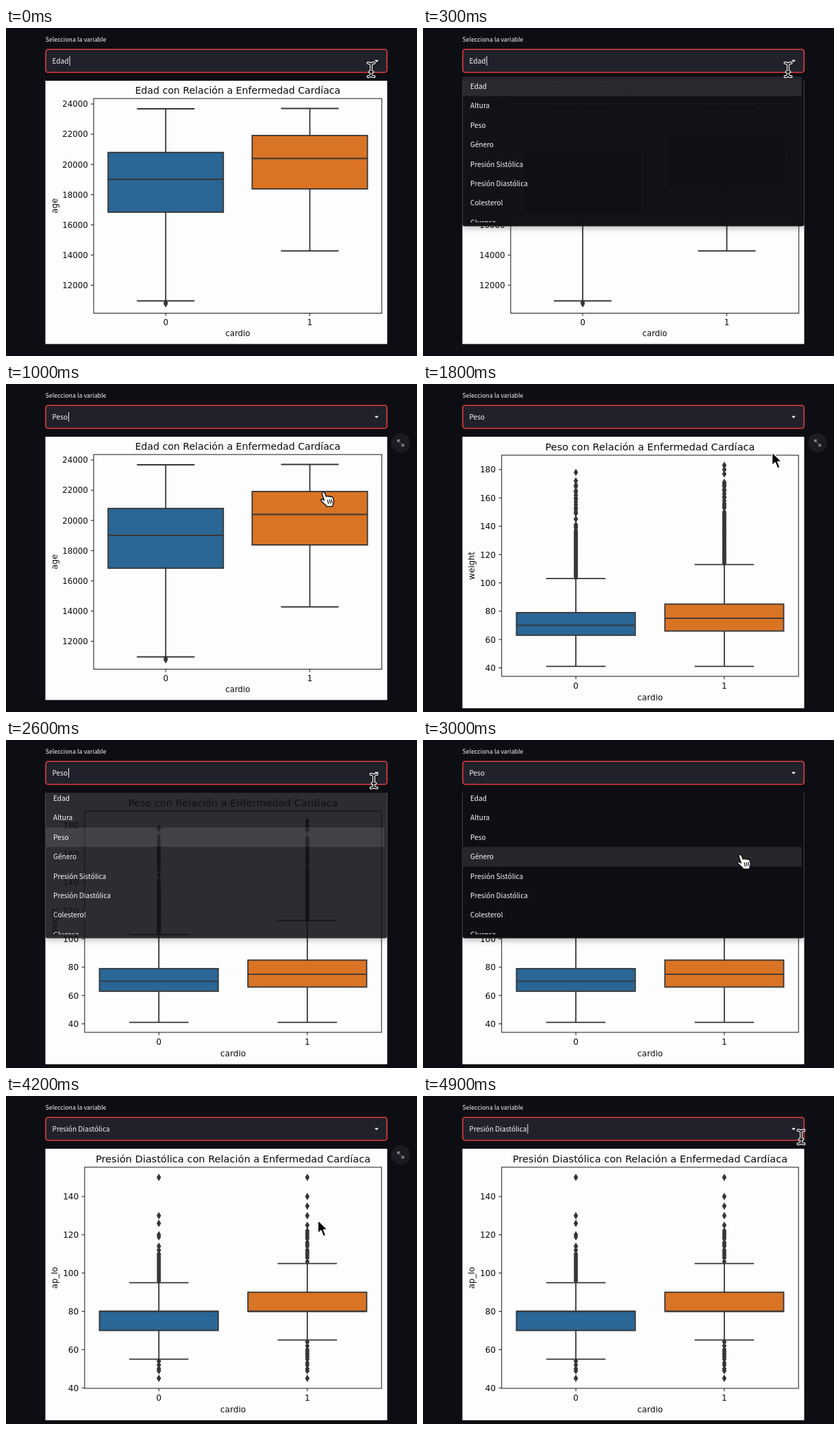
Recreate the animation shown at these times as an HTML page. Size 600 by 479 pixels, loop 5 s.

```html
<!DOCTYPE html>
<html lang="es">
<head>
<meta charset="utf-8">
<title>Selecciona la variable</title>
<style>
  html, body { margin: 0; width: 100%; height: 100%; overflow: hidden; background: #0d0e13; }
  svg { display: block; }
  .ui { font-family: "Noto Sans CJK JP", "Noto Sans CJK SC", "Noto Sans CJK", "Open Sans", sans-serif; font-size: 10.1px; fill: #fafafa; }
  .label { font-size: 8.84px; }
  .chart text { font-family: "DejaVu Sans", sans-serif; fill: #0b0b0b; }
  .mid { text-anchor: middle; }
  .end { text-anchor: end; }
  .axis { fill: none; stroke: #161616; stroke-width: 1; }
  .mark { stroke: #363636; stroke-width: 1.8; fill: none; }
  .flier { fill: #363636; stroke: #363636; stroke-width: 1.2; }
  #menu .panel { fill: #0e0f14; filter: drop-shadow(0 3px 5px rgba(0, 0, 0, .28)); }
</style>
</head>
<body>
<svg width="600" height="479" viewBox="0 0 600 479">
  <defs>
    <clipPath id="list"><rect x="57" y="71" width="500" height="213"/></clipPath>
  </defs>
  <text class="ui label" x="57.5" y="20.4">Selecciona la variable</text>
  <rect x="58" y="31.2" width="498.2" height="33.6" rx="3.5" fill="#21212b" stroke="#e03d3f" stroke-width="1.6"/>
  <text class="ui" id="value" x="67.5" y="52"></text>
  <rect id="caret" y="41" width="1" height="14" fill="#f0f0f0"/>
  <path d="M538 46.8h6l-3 3.2z" fill="#fafafa"/>

  <g id="charts"></g>

  <g id="expand">
    <circle cx="576" cy="86" r="14" fill="#1b1c22"/>
    <path d="M571.8 85v-3.4h3.4M572 81.8l3.3 3.3M580.4 87.2v3.4H577M580.2 90.4l-3.3-3.3" fill="none" stroke="#8b8c91" stroke-width="1.4"/>
  </g>

  <g id="menu">
    <rect class="panel" x="57.5" y="71" width="499" height="218.5" rx="3.5"/>
    <rect id="hover" x="57.5" width="495" height="28.4" fill="#26272d"/>
    <g id="items" class="ui" clip-path="url(#list)"></g>
  </g>

  <g id="cursor">
    <g id="ibeam" fill="none" stroke-linecap="round">
      <path id="beam" d="M-4.5-10Q-.6-10 0-7.5Q.6-10 4.5-10M0-7.5V7.5M-4.5 10Q-.6 10 0 7.5Q.6 10 4.5 10M-2.5 3.2h5" stroke="#fff" stroke-width="4"/>
      <use href="#beam" id="core"/>
      <path d="M-4.5-10Q-.6-10 0-7.5Q.6-10 4.5-10M0-7.5V7.5M-4.5 10Q-.6 10 0 7.5Q.6 10 4.5 10M-2.5 3.2h5" stroke="#0a0a0a" stroke-width="1.7"/>
    </g>
    <path id="arrow" d="M0 0V19.5L4.6 15.3L8 23.6L11.6 22.1L8.2 14H14.2Z" fill="#050505" stroke="#fff" stroke-width="1.5" stroke-linejoin="round"/>
    <g id="hand" transform="translate(-5.5 -.6)" stroke="#0a0a0a" stroke-linecap="round" stroke-linejoin="round">
      <path d="M4 2.4C4.6.8 7 .9 7.7 2.5L10 8C11 7 12.5 7 13.3 8C14.3 7.2 15.8 7.4 16.4 8.5C17.5 7.8 19.2 8 19.8 9.6L21 14C21.5 17 20.8 18.5 19.5 21L19 22.5H10.5L9.5 20.8L3 14.8C1.2 13 2.8 10.8 4.8 12L7 13.5L4 4.5Z" fill="#fff" stroke-width="1.4"/>
      <path d="M12 13.2l1.2 5M14.9 12.8l1.1 5M17.6 12.4l1 5" fill="none" stroke-width="1.2"/>
    </g>
  </g>
</svg>
<script>
const $ = id => document.getElementById(id);
const show = (id, on) => { $(id).style.display = on ? '' : 'none'; };
$('core').remove();

const LOOP = 5000, STEP = 100, ROW = 28.4;
const OPTIONS = ['Edad', 'Altura', 'Peso', 'Género', 'Presión Sistólica', 'Presión Diastólica', 'Colesterol', 'Glucosa'];
const FILLS = ['#2a6696', '#da7425'];

// "104-138 140" -> every integer in the listed ranges
const expand = text => text.split(' ').filter(Boolean).flatMap(part => {
  const [a, b = a] = part.split('-').map(Number);
  return Array.from({ length: b - a + 1 }, (_, i) => a + i);
});

// box: [low whisker, q1, median, q3, high whisker, outliers]
const CHARTS = [
  { name: 'Edad', unit: 'age', pt: 1.178, left: 128, top: 103, height: 384.5,
    ticks: [12000, 24000, 2000], y: v => 111 + (24000 - v) * .02206,
    boxes: [[10967, 16838, 19014, 20795, 23683, '10770 10860'], [14276, 18379, 20396, 21915, 23705, '']] },
  { name: 'Peso', unit: 'weight', pt: 1.2136, left: 114.8, top: 104, height: 396.5,
    ticks: [40, 180, 20], y: v => 414.5 - (v - 40) * 2.068,
    boxes: [[41, 63, 70, 79, 103, '104-137 139-141 145 149 150 152 153 155 157 159 160 162 164 165 168 169 172 178'],
            [41, 66, 75, 85, 113, '114-150 153-156 158 160 161 163 165 166 168-171 177 180 183']] },
  { name: 'Presión Diastólica', unit: 'ap_lo', pt: 1.2136, left: 114.8, top: 104, height: 396.5,
    ticks: [40, 140, 20], y: v => 426.3 - (v - 40) * 2.795,
    boxes: [[55, 70, 80, 80, 95, '45 49 50 52 54 96-110 112 114 119 120 126 130 150'],
            [65, 80, 80, 90, 105, '45 49 50 52 53 55-60 62 64 106 108-112 114-116 118-122 125 130 135 140 150']] },
];

function drawBox(c, [lo, q1, med, q3, hi, outliers], i, slot) {
  const x = c.left + slot * (i + .5), half = slot * .4, cap = slot * .2;
  const [a, b, m, d, e] = [lo, q1, med, q3, hi].map(c.y);
  const w = 2.55 * c.pt / 1.2, h = 4.24 * c.pt / 1.2;
  const fliers = expand(outliers).map(v => `M${x} ${c.y(v) - h}l${w} ${h}l${-w} ${h}l${-w} ${-h}z`).join('');
  return `<rect class="mark" x="${x - half}" y="${d}" width="${2 * half}" height="${b - d}" style="fill:${FILLS[i]}"/>
    <path class="mark" d="M${x} ${b}V${a}M${x} ${d}V${e}M${x - cap} ${a}h${2 * cap}M${x - cap} ${e}h${2 * cap}M${x - half} ${m}h${2 * half}"/>
    <path class="flier" d="${fliers}"/>`;
}

function drawChart(c, n) {
  const { pt, left, top } = c, w = 357.12 * pt, h = 266.1 * pt;
  const bottom = top + h, mid = left + w / 2, slot = w / 2, tick = 3.5 * pt, font = 10 * pt;
  let out = `<rect x="57.5" y="77" width="499" height="${c.height}" fill="#fdfdfe"/>`;
  out += c.boxes.map((b, i) => drawBox(c, b, i, slot)).join('');
  out += `<rect class="axis" x="${left}" y="${top}" width="${w}" height="${h}"/>`;
  const [from, to, by] = c.ticks;
  for (let v = from; v <= to; v += by) {
    out += `<path class="axis" d="M${left} ${c.y(v)}h${-tick}"/>
      <text class="end" x="${left - 2 * tick}" y="${c.y(v) + .37 * font}">${v}</text>`;
  }
  for (const i of [0, 1]) {
    const x = left + slot * (i + .5);
    out += `<path class="axis" d="M${x} ${bottom}v${tick}"/>
      <text class="mid" x="${x}" y="${bottom + 2 * tick + .78 * font}">${i}</text>`;
  }
  out += `<text class="mid" x="${mid}" y="${bottom + 28.8 * pt}">cardio</text>
    <text class="mid" transform="translate(${57.5 + 14.8 * pt} ${top + h / 2}) rotate(-90)">${c.unit}</text>
    <text class="mid" x="${mid}" y="${top - 6 * pt}" style="font-size:${12 * pt}px">${c.name} con Relación a Enfermedad Cardíaca</text>`;
  return `<g class="chart" id="chart${n}" font-size="${font}">${out}</g>`;
}

$('charts').innerHTML = CHARTS.map(drawChart).join('');
$('items').innerHTML = OPTIONS.map((name, i) => `<text x="69" y="${89 + i * ROW}">${name}</text>`).join('');

// time, x, y of the hot spot, pointer from then on
const PATH = [
  [0, 533, 61, 'ibeam'], [300, 533, 61, 'ibeam'], [400, 522, 84, 'hand'], [500, 488, 132, 'hand'],
  [600, 466, 155, 'hand'], [800, 463, 157, 'hand'], [1100, 463, 157, 'arrow'], [1500, 466, 153, 'arrow'],
  [1800, 509.5, 99.5, 'arrow'], [2100, 524, 82, 'arrow'], [2300, 537, 60, 'ibeam'], [2700, 537, 60, 'ibeam'],
  [2800, 524, 84, 'hand'], [3100, 432, 208, 'hand'], [3300, 409.5, 246.5, 'hand'], [3400, 410, 246.5, 'hand'],
  [3700, 410, 246.5, 'arrow'], [4100, 428, 222, 'arrow'], [4400, 510, 100, 'arrow'],
  [4500, 540, 66, 'ibeam'], [4700, 553, 57, 'ibeam'], [4900, 552, 60, 'ibeam'],
];
const within = (t, spans) => spans.some(([a, b]) => t >= a && t < b);
const FADE = [.5, .87, .98, 1];
const MENU = [[100, 1000], [2500, 3600]];
const CARET = [[0, 700], [1000, 1500], [2000, 3000], [3600, 4100], [4600, 5000]];
const EXPAND = [[1000, 2300], [3600, 4500]];

function pointer(t) {
  const i = PATH.findLastIndex(p => p[0] <= t);
  const [t0, x0, y0, kind] = PATH[i], [t1, x1, y1] = PATH[i + 1] || [LOOP, x0, y0];
  const k = (t - t0) / (t1 - t0);
  return { x: x0 + (x1 - x0) * k, y: y0 + (y1 - y0) * k, kind };
}

function render(t) {
  const p = pointer(t);
  $('cursor').setAttribute('transform', `translate(${p.x} ${p.y})`);
  for (const kind of ['ibeam', 'arrow', 'hand']) show(kind, kind === p.kind);

  const picked = t < 1000 ? 0 : t < 3600 ? 2 : 5;
  const value = $('value');
  value.textContent = OPTIONS[picked];
  $('caret').setAttribute('x', 68.5 + value.getComputedTextLength());
  show('caret', within(t, CARET));

  const chart = t < 1300 ? 0 : t < 3900 ? 1 : 2;
  CHARTS.forEach((_, i) => show('chart' + i, i === chart));
  show('expand', within(t, EXPAND));

  const open = MENU.find(span => within(t, [span]));
  show('menu', !!open);
  if (open) {
    $('menu').style.opacity = FADE[Math.min(3, (t - open[0]) / STEP)];
    const row = p.kind === 'hand' ? Math.max(0, Math.floor((p.y - 77) / ROW)) : picked;
    $('hover').setAttribute('y', 71 + row * ROW);
  }
}

const start = performance.now();
let last = -1;
function frame() {
  const t = Math.floor((performance.now() - start) % LOOP / STEP) * STEP;
  if (t !== last) render(last = t);
  requestAnimationFrame(frame);
}
frame();
</script>
</body>
</html>
```
